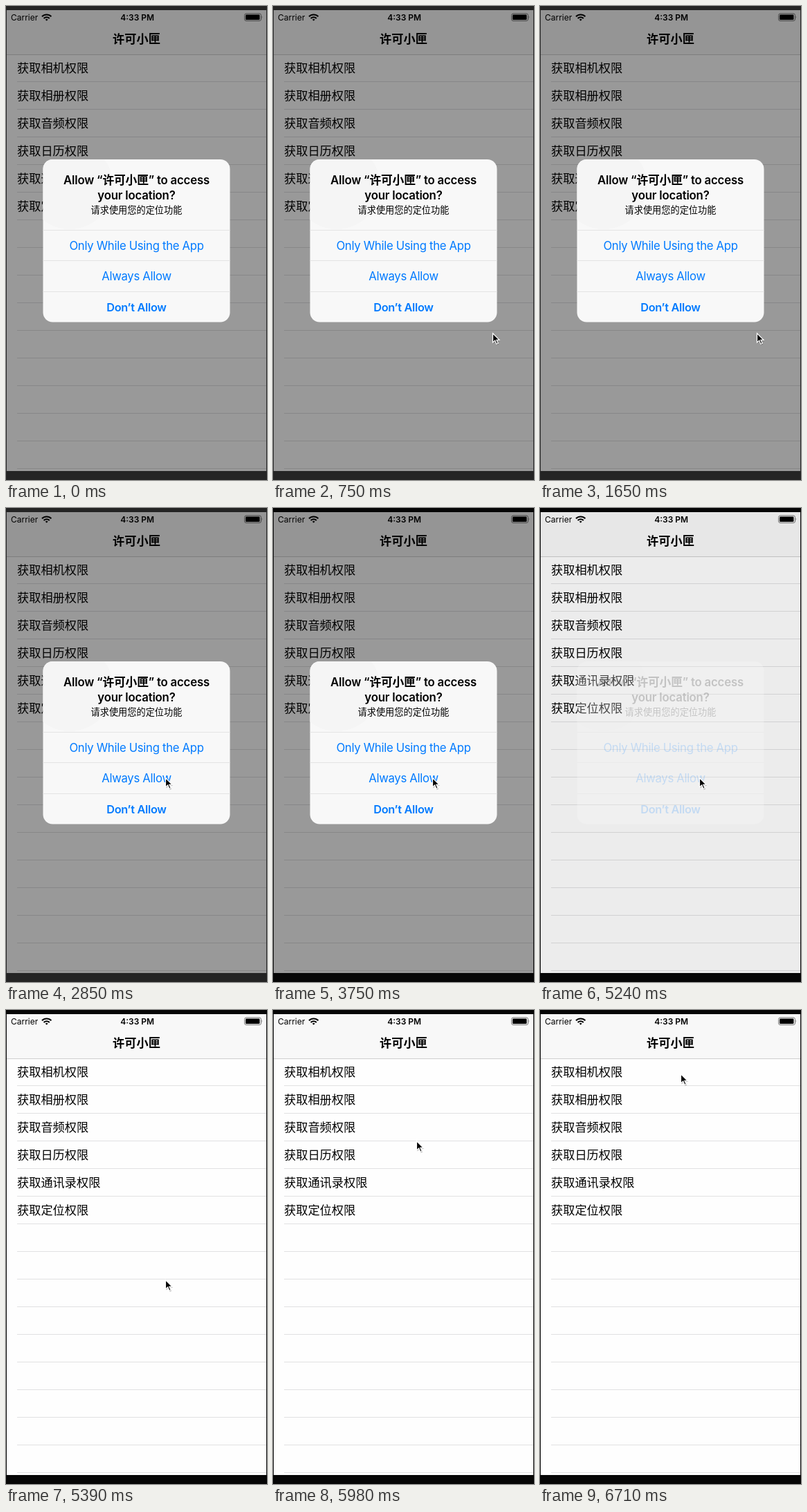
Recreate the animation shown at these times as an HTML page. Size 377x686 px, loop 8 s.

```html
<!DOCTYPE html>
<html lang="zh-CN">
<head>
<meta charset="utf-8">
<style>
  html, body { margin: 0; width: 100%; height: 100%; overflow: hidden; }
  svg { display: block; width: 377px; height: 686px; font-family: Inter, "Noto Sans CJK SC", "Noto Sans CJK", sans-serif; }
  .cjk { font-family: "Noto Sans CJK SC", "Noto Sans CJK", sans-serif; }
  .mid { text-anchor: middle; }
  .bold { font-weight: 600; }
  .title { font-size: 16.8px; letter-spacing: -.2px; }
  .button { font-size: 16.7px; letter-spacing: -.3px; fill: #007aff; }
  .button.bold { font-size: 16.3px; }
</style>
</head>
<body>
<svg viewBox="0 0 377 686">
  <rect id="bezel" width="377" height="686"/>
  <rect x="1" y="6" width="375" height="667" fill="#fefefe"/>
  <rect x="1" y="6" width="375" height="64" fill="#f8f8f8"/>
  <path d="M1 70.5H376" stroke="#cfcfcf"/>

  <text x="7" y="20.5" font-size="12">Carrier</text>
  <g fill="none" stroke="#000" stroke-width="2.1">
    <path d="M52 15.3a9.4 9.4 0 0 1 13.4 0M54.6 17.9a5.8 5.8 0 0 1 8.2 0"/>
    <path d="M58.7 21.6L56.8 19.7a2.7 2.7 0 0 1 3.8 0z" fill="#000" stroke="none"/>
  </g>
  <text class="mid bold" x="189.7" y="20.5" font-size="12">4:33 PM</text>
  <rect x="344.5" y="11" width="24" height="10.5" rx="2.5" fill="none" stroke="#777"/>
  <rect x="346" y="12.5" width="20.5" height="7.5" rx="1.2"/>
  <path d="M369.7 14.2q1.6 2 0 4z" fill="#777"/>
  <text class="cjk mid" x="188.5" y="54" font-size="17.2" font-weight="700">许可小匣</text>

  <g id="rows" class="cjk" font-size="17.2"></g>

  <rect id="dim" x="1" y="6" width="375" height="667"/>
  <clipPath id="round"><rect x="53.5" y="222" width="270" height="235.5" rx="14"/></clipPath>
  <g id="card" clip-path="url(#round)">
    <rect x="53" y="222" width="271" height="236" fill="#f8f8f8"/>
    <circle cx="92" cy="260" r="63" fill="#f5f5f5"/>
    <path d="M53 324.5H324M53 368.5H324M53 413.5H324" stroke="#e4e4e4"/>
  </g>
  <g id="message">
    <text class="mid bold title" x="188.5" y="258">Allow “许可小匣” to access</text>
    <text class="mid bold title" x="188.5" y="280">your location?</text>
    <text class="cjk mid" x="188.5" y="300.3" font-size="13.2">请求使用您的定位功能</text>
    <text class="mid button" x="188.5" y="352.5">Only While Using the App</text>
    <text class="mid button" x="188.5" y="397.3">Always Allow</text>
    <text class="mid button bold" x="188.5" y="441.7">Don’t Allow</text>
  </g>

  <g id="cursor">
    <path d="M1.5 .5V14.3L4.6 11.5 6.8 16.6 9.4 15.5 7.2 10.6H11.5z" opacity=".25" transform="translate(.8 1.2)"/>
    <path d="M1.5 .8V14L4.7 11.1 6.9 16.2 9.1 15.2 6.9 10.3H11z" stroke="#fff" stroke-width="1.2"/>
  </g>
</svg>
<script>
  const LOOP = 8000, APPEAR = 750, FADE = 5240, CLOSED = 5390;
  const $ = id => document.getElementById(id);

  const easeIn = p => p ** 1.5;
  const easeOut = p => 1 - (1 - p) ** 2;

  // Each glide runs from the previous resting place and advances in equal steps.
  const home = { x: 316, y: 473 };
  const glides = [
    { from: APPEAR, to: 1650, steps: 3, x: 312, y: 473, ease: easeIn },
    { from: 1650, to: 2850, steps: 8, x: 229, y: 390, ease: easeIn },
    { from: 5540, to: 5690, steps: 1, x: 263, y: 379, ease: easeIn },
    { from: 5690, to: 5840, steps: 1, x: 263, y: 391, ease: easeIn },
    { from: 5840, to: 6130, steps: 2, x: 187, y: 122, ease: easeOut },
    { from: 6130, to: 6710, steps: 4, x: 202, y: 92, ease: p => easeOut(easeOut(p)) }
  ];

  function pointerAt(t) {
    let { x, y } = home;
    for (const g of glides) {
      if (t < g.from) break;
      const step = Math.floor((t - g.from) / (g.to - g.from) * g.steps + 0.04);
      const p = g.ease(Math.min(step / g.steps, 1));
      x += (g.x - x) * p;
      y += (g.y - y) * p;
    }
    return `translate(${Math.round(x)} ${Math.round(y)})`;
  }

  const labels = ['相机', '相册', '音频', '日历', '通讯录', '定位'];
  let rows = '';
  for (let i = 0; i < 15; i++) {
    const y = 109.5 + i * 40;
    rows += `<path d="M16 ${y}H376" stroke="#e1e1e2"/>`;
    if (labels[i]) rows += `<text x="16" y="${y - 13.5}">获取${labels[i]}权限</text>`;
  }
  $('rows').innerHTML = rows;

  function draw() {
    const t = performance.now() % LOOP;
    const shown = t < FADE ? 1 : t < CLOSED ? 0.18 : 0;
    $('bezel').setAttribute('fill', t < 3750 ? '#242424' : '#060606');
    $('dim').setAttribute('opacity', 0.4 * shown);
    $('card').setAttribute('opacity', shown ** 0.7);
    $('message').setAttribute('opacity', shown);
    $('cursor').setAttribute('visibility', t < APPEAR ? 'hidden' : 'visible');
    $('cursor').setAttribute('transform', pointerAt(t));
    requestAnimationFrame(draw);
  }
  draw();
</script>
</body>
</html>
```
